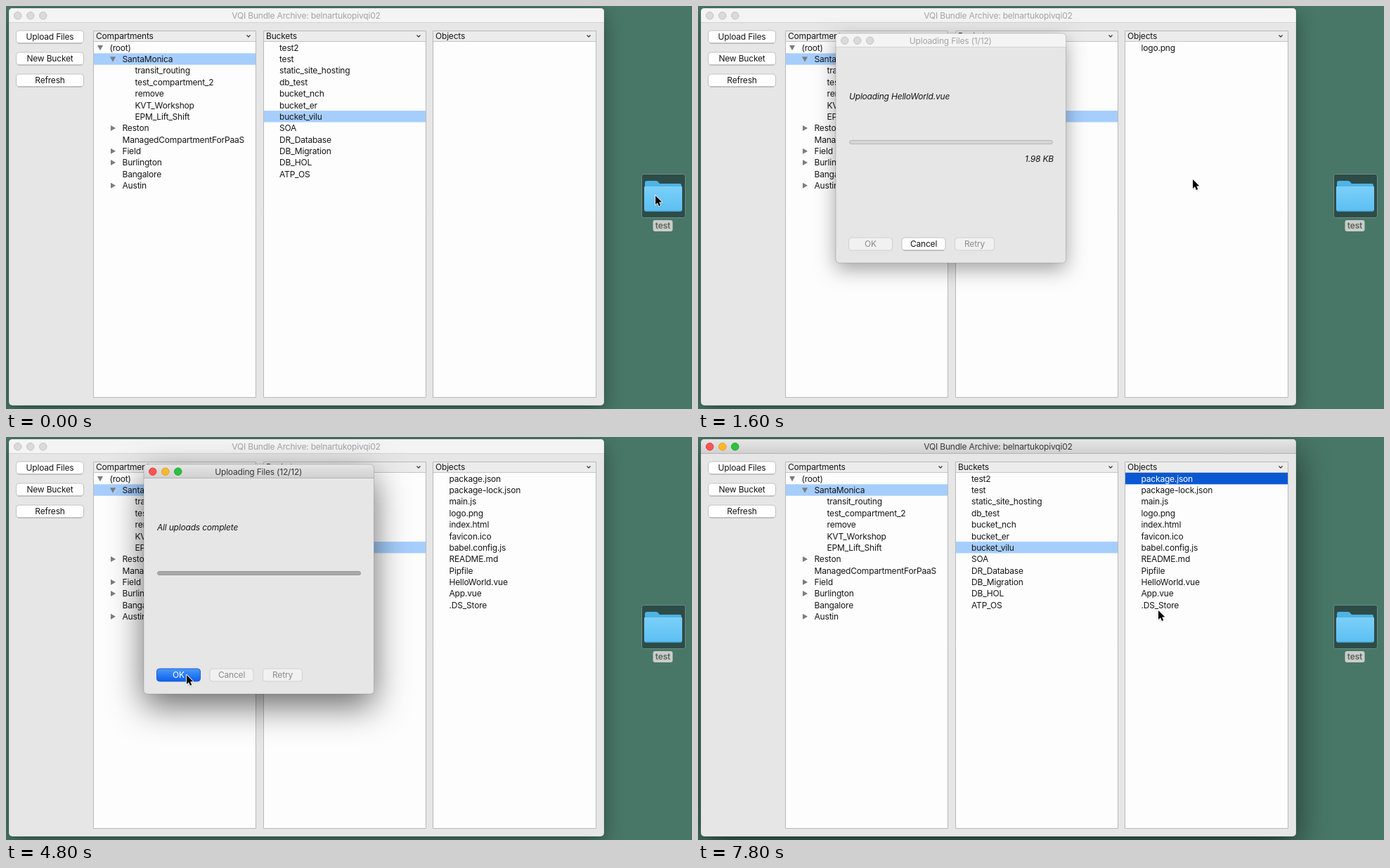
Recreate the animation shown at these times as an HTML page with a canvas. Size 976 by 574 pixels, loop 8 s.

```html
<!DOCTYPE html>
<html lang="en">
<head>
<meta charset="utf-8">
<title>Object upload</title>
<style>
  html, body { margin: 0; width: 100%; height: 100%; overflow: hidden; background: #487767; }
  canvas { display: block; width: 976px; height: 574px; }
</style>
</head>
<body>
<canvas id="stage" width="976" height="574"></canvas>
<script>
const ctx = document.getElementById('stage').getContext('2d');
const LOOP = 8000, STEP = 200;
const ROW_TOP = 51, ROW = 16.35;
const FONT = 'Inter, Roboto, sans-serif';
const TITLE = 'VQI Bundle Archive: belnartukopivqi02';

// indent level, arrow state, label
const COMPARTMENTS = [
  [0, 'open', '(root)'],
  [1, 'open', 'SantaMonica'],
  [2, '', 'transit_routing'],
  [2, '', 'test_compartment_2'],
  [2, '', 'remove'],
  [2, '', 'KVT_Workshop'],
  [2, '', 'EPM_Lift_Shift'],
  [1, 'shut', 'Reston'],
  [1, '', 'ManagedCompartmentForPaaS'],
  [1, 'shut', 'Field'],
  [1, 'shut', 'Burlington'],
  [1, '', 'Bangalore'],
  [1, 'shut', 'Austin']
];

const BUCKETS = ['test2', 'test', 'static_site_hosting', 'db_test', 'bucket_nch', 'bucket_er',
  'bucket_vilu', 'SOA', 'DR_Database', 'DB_Migration', 'DB_HOL', 'ATP_OS'];

// upload order, with sizes
const FILES = [
  ['logo.png', '6.69 KB'], ['HelloWorld.vue', '1.98 KB'], ['App.vue', '489 B'],
  ['main.js', '136 B'], ['favicon.ico', '1.12 KB'], ['index.html', '549 B'],
  ['babel.config.js', '53 B'], ['package-lock.json', '391 KB'], ['package.json', '863 B'],
  ['README.md', '325 B'], ['Pipfile', '138 B'], ['.DS_Store', '6.0 KB']
];

// time, x, y of the pointer tip
const POINTER = [
  [0, 924, 270], [800, 704, 247], [2600, 704, 247], [3400, 421, 283], [3600, 421, 283],
  [4200, 257, 339], [5200, 257, 339], [6400, 656, 58], [7400, 656, 58], [7800, 655, 247]
];

function pointerAt(t) {
  for (let i = 1; i < POINTER.length; i++) {
    const [t0, x0, y0] = POINTER[i - 1], [t1, x1, y1] = POINTER[i];
    if (t <= t1) {
      const u = (t - t0) / (t1 - t0), k = u * u * (3 - 2 * u);
      return [x0 + (x1 - x0) * k, y0 + (y1 - y0) * k];
    }
  }
  return POINTER[POINTER.length - 1].slice(1);
}

function text(str, x, y, { color = '#161616', align = 'left', style = '' } = {}) {
  ctx.font = `${style} 12px ${FONT}`;
  ctx.letterSpacing = '-0.19px';
  ctx.textAlign = align;
  ctx.fillStyle = color;
  ctx.fillText(str, x, y + 4.3);
}

function box(x, y, w, h, r, fill, stroke) {
  ctx.beginPath();
  ctx.roundRect(x, y, w, h, r);
  if (fill) { ctx.fillStyle = fill; ctx.fill(); }
  if (stroke) { ctx.strokeStyle = stroke; ctx.lineWidth = 1; ctx.stroke(); }
}

function vertical(y0, y1, top, bottom) {
  const g = ctx.createLinearGradient(0, y0, 0, y1);
  g.addColorStop(0, top);
  g.addColorStop(1, bottom);
  return g;
}

function polygon(points, fill) {
  ctx.beginPath();
  points.forEach(([x, y]) => ctx.lineTo(x, y));
  ctx.closePath();
  ctx.fillStyle = fill;
  ctx.fill();
}

function shadow(alpha, blur, dy) {
  ctx.shadowColor = `rgba(0,0,0,${alpha})`;
  ctx.shadowBlur = blur;
  ctx.shadowOffsetY = dy;
}

function frame(x, y, w, h, bar, title, active) {
  ctx.save();
  active ? shadow(0.58, 48, 17) : shadow(0.36, 28, 9);
  box(x, y, w, h, 5, '#e6e6e6');
  ctx.restore();
  box(x, y, w, bar, [5, 5, 0, 0], active ? vertical(y, y + bar, '#e7e6e7', '#d0cfd0') : '#f4f4f5');
  ctx.fillStyle = active ? '#b4b4b4' : '#d3d3d3';
  ctx.fillRect(x, y + bar - 1, w, 1);
  box(x, y, w, h, 5, null, 'rgba(0,0,0,.16)');
  const fills = active ? ['#fc5551', '#fdb827', '#2ac23b'] : Array(3).fill('#dadada');
  const rims = active ? ['#de403c', '#dc9d22', '#1fa52e'] : Array(3).fill('#c3c3c3');
  fills.forEach((fill, i) => {
    box(x + 7.5 + i * 18, y + bar / 2 - 5, 10.5, 10.5, 5.25, fill, rims[i]);
  });
  text(title, x + w / 2 - 0.5, y + bar / 2 + 0.6, { align: 'center', color: active ? '#393939' : '#a3a3a6' });
}

function button(label, x, y, w, kind = 'normal') {
  const off = kind === 'off', blue = kind === 'blue' || kind === 'pressed';
  let fill = off ? '#f1f1f1' : '#fff';
  if (kind === 'blue') fill = vertical(y, y + 18.5, '#4d9bf8', '#0a5ff2');
  if (kind === 'pressed') fill = vertical(y, y + 18.5, '#2f7ce0', '#0546c4');
  box(x + 0.5, y + 0.5, w - 1, 18, 4, fill, blue ? '#1c5fce' : off ? '#d0d0d0' : '#c2c2c2');
  if (!off && !blue) {
    ctx.fillStyle = '#a9a9a9';
    ctx.fillRect(x + 3, y + 18, w - 6, 1);
  }
  text(label, x + w / 2, y + 9.2, { align: 'center', color: blue ? '#fff' : off ? '#8b8b8b' : '#161616' });
}

function panel(x, w, label) {
  box(x + 0.5, 35.5, w - 1, 522, 0, '#fdfdfd', '#b9b9b9');
  ctx.fillStyle = '#ececec';
  ctx.fillRect(x + 1, 36, w - 2, 14);
  ctx.fillStyle = '#c4c4c4';
  ctx.fillRect(x + 1, 50, w - 2, 1);
  text(label, x + 4, 42.6);
  ctx.beginPath();
  ctx.moveTo(x + w - 13.5, 41.5);
  ctx.lineTo(x + w - 11, 44);
  ctx.lineTo(x + w - 8.5, 41.5);
  ctx.strokeStyle = '#333';
  ctx.lineWidth = 1.2;
  ctx.stroke();
}

const rowMid = i => ROW_TOP + ROW * (i + 0.5) + 0.3;

function highlight(x, w, i, fill) {
  ctx.fillStyle = fill;
  ctx.fillRect(x + 1, ROW_TOP + ROW * i, w - 2, ROW);
}

function arrow(x, y, state) {
  const open = [[x - 4, y - 3.5], [x + 4, y - 3.5], [x, y + 3.8]];
  const shut = [[x - 3, y - 4], [x + 4, y], [x - 3, y + 4]];
  polygon(state === 'open' ? open : shut, '#7c7c7c');
}

function mainWindow(t, done) {
  frame(4, 3, 847, 566, 21, TITLE, t >= 5200);
  ['Upload Files', 'New Bucket', 'Refresh'].forEach((s, i) => button(s, 14, 34.5 + i * 31, 97));

  panel(124, 232, 'Compartments');
  highlight(124, 232, 1, '#a6cefd');
  COMPARTMENTS.forEach(([level, state, label], i) => {
    if (state) arrow(134 + level * 18, rowMid(i), state);
    text(label, 147.5 + level * 18, rowMid(i));
  });

  panel(366, 232, 'Buckets');
  highlight(366, 232, 6, '#a6cefd');
  BUCKETS.forEach((s, i) => text(s, 389, rowMid(i)));

  panel(607, 233, 'Objects');
  const picked = t >= 7400;
  if (picked) highlight(607, 233, 0, '#0a58d2');
  FILES.slice(0, done).map(f => f[0]).sort().reverse().forEach((s, i) => {
    text(s, 630.5, rowMid(i), { color: picked && i === 0 ? '#fff' : '#161616' });
  });
}

function dialog(t, done) {
  const finished = done === FILES.length;
  const italic = { style: 'italic' };
  frame(196, 39, 327.5, 327, 20, `Uploading Files (${done}/${FILES.length})`, t >= 4400);
  text(finished ? 'All uploads complete' : 'Uploading ' + FILES[done][0], 215, 128.5, italic);
  box(215.5, 191.5, 289, 5, 2.5, finished ? '#a9a9a9' : '#d5d5d5', finished ? '#989898' : '#b6b6b6');
  if (!finished) text(FILES[done][1], 506, 217.5, { ...italic, align: 'right' });
  const okKind = !finished ? 'off' : t < 4400 ? 'normal' : t >= 5000 ? 'pressed' : 'blue';
  button('OK', 214, 329.5, 63, okKind);
  button('Cancel', 289.5, 329.5, 63, finished ? 'off' : 'normal');
  button('Retry', 365, 329.5, 57, 'off');
}

function folder(cx, cy) {
  const x = cx - 27, y = cy - 22;
  ctx.beginPath();
  ctx.moveTo(x + 1, y + 12);
  ctx.lineTo(x + 1, y + 3);
  ctx.quadraticCurveTo(x + 1, y, x + 4, y);
  ctx.lineTo(x + 17, y);
  ctx.quadraticCurveTo(x + 19, y, x + 22, y + 4);
  ctx.lineTo(x + 51, y + 4);
  ctx.quadraticCurveTo(x + 53, y + 4, x + 53, y + 7);
  ctx.lineTo(x + 53, y + 12);
  ctx.closePath();
  ctx.fillStyle = '#4fb3e4';
  ctx.fill();
  box(x, y + 8, 54, 35.5, [1, 1, 3, 3], vertical(y + 8, y + 43, '#7bd0f9', '#5cbff2'));
  ctx.fillStyle = '#47a6da';
  ctx.fillRect(x + 1, y + 42.5, 52, 1);
}

function iconLabel(cx, cy, fill, color) {
  box(cx - 14, cy - 8, 28, 16, 3, fill);
  text('test', cx, cy, { align: 'center', color, style: '600' });
}

function desktopIcon() {
  box(904.5, 239.5, 62, 62, 3, '#2d4c48', '#728b84');
  folder(935, 271);
  iconLabel(934.5, 313, '#c9cdca', '#5c605e');
}

function draggedIcon(px, py) {
  const cx = px - 1.5, cy = py - 2.5;
  ctx.save();
  ctx.globalAlpha = 0.9;
  ctx.save();
  shadow(0.3, 22, 4);
  box(cx - 26, cy - 14, 52, 35, 3, '#74c9f6');
  ctx.restore();
  folder(cx, cy);
  ctx.restore();
  iconLabel(cx - 0.5, cy + 42, '#1c69d4', '#fff');
}

function plusBadge(px, py) {
  const x = px + 8, y = py + 19;
  box(x - 8.5, y - 8.5, 17, 17, 8.5, vertical(y - 8, y + 8, '#46b83c', '#16911a'), '#128018');
  ctx.fillStyle = '#fff';
  ctx.fillRect(x - 5, y - 1.1, 10, 2.2);
  ctx.fillRect(x - 1.1, y - 5, 2.2, 10);
}

function pointer(x, y) {
  const shape = [[0, 0], [0, 13], [3, 10.2], [5, 15], [7.2, 14], [5.2, 9.5], [9.2, 9.3]]
    .map(([dx, dy]) => [x + dx, y + dy]);
  ctx.save();
  shadow(0.35, 3, 1);
  polygon(shape, '#000');
  ctx.restore();
  ctx.strokeStyle = '#fff';
  ctx.lineWidth = 1.8;
  ctx.lineJoin = 'round';
  ctx.stroke();
  polygon(shape, '#000');
}

function draw(t) {
  const done = Math.max(0, Math.min(FILES.length, (t - 1400) / STEP));
  const [px, py] = pointerAt(t);
  const dragging = t >= 200 && t < 1200;
  ctx.fillStyle = '#487767';
  ctx.fillRect(0, 0, 976, 574);
  desktopIcon();
  mainWindow(t, done);
  if (t >= 1400 && t < 5200) dialog(t, done);
  if (dragging) draggedIcon(px, py);
  pointer(px, py);
  if (dragging && px < 851) plusBadge(px, py);
}

const start = performance.now();
function tick() {
  const t = (performance.now() - start) % LOOP;
  draw(Math.floor(t / STEP) * STEP);
  requestAnimationFrame(tick);
}
tick();
</script>
</body>
</html>
```
